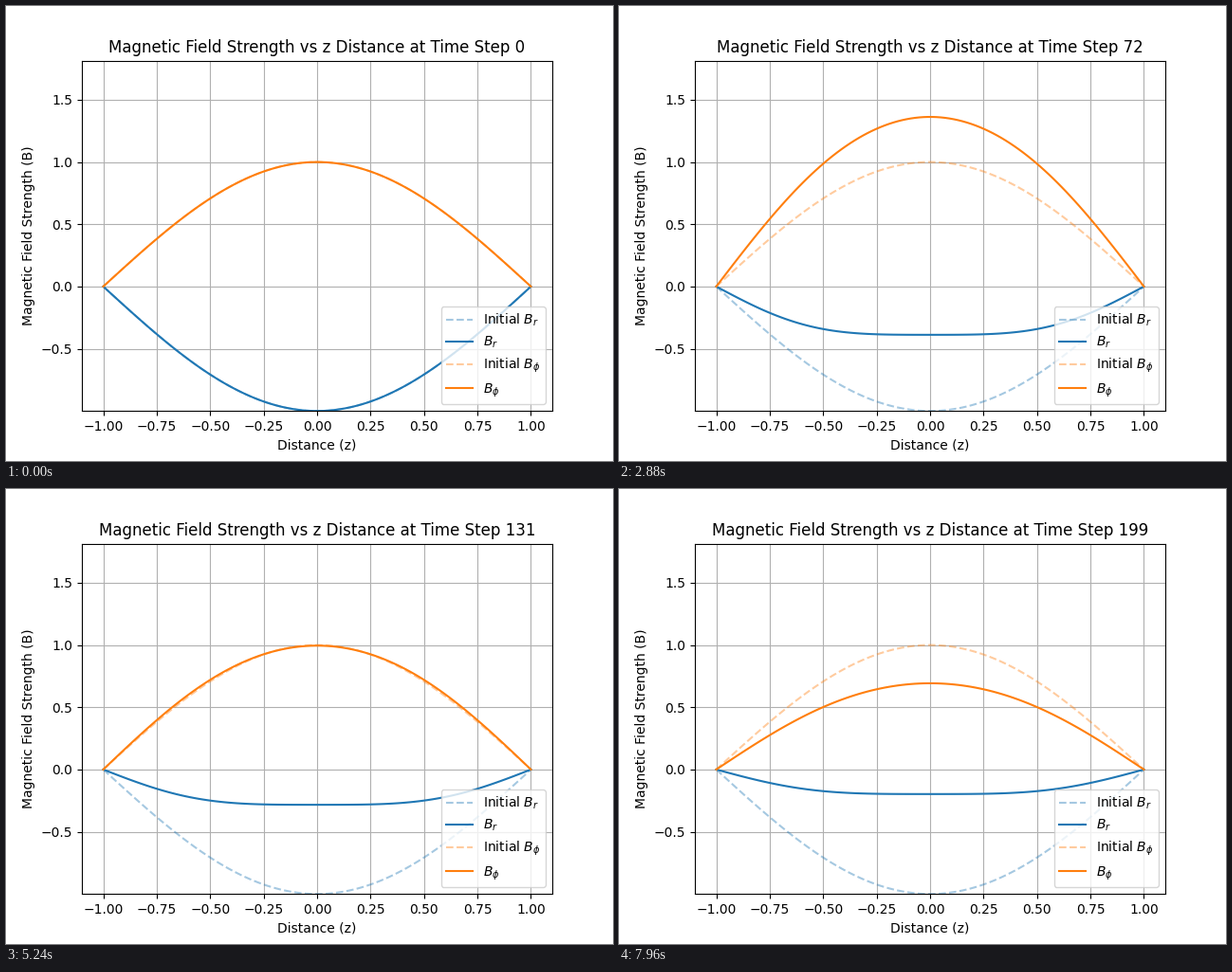
Write a matplotlib script that moves like this. It is 640 px wide and 480 px high and loops after 8000 ms.

```python
import numpy as np
import matplotlib.pyplot as plt
from matplotlib.animation import FuncAnimation

STEPS = 200
INTERVAL = 40

# Mean-field dynamo expanded in cos(n*pi*z/2) modes
MODES = np.array([1, 3, 5])
DECAY_R, DECAY_PHI = 0.12232, 0.10862
SHEAR, ALPHA = 0.3269, 0.03832

z = np.linspace(-1, 1, 100)
basis = np.cos(np.outer(z, MODES) * np.pi / 2)


def dynamo_matrix():
    """Linear operator acting on (Br modes, Bphi modes)."""
    k = len(MODES)
    alpha = np.zeros((k, k))
    for j, n in enumerate(MODES):
        alpha[max(j - 1, 0), j] -= ALPHA * n
        if j + 1 < k:
            alpha[j + 1, j] += ALPHA * n
    return np.block([
        [-DECAY_R * np.diag(MODES**2), alpha],
        [-SHEAR * np.eye(k), -DECAY_PHI * np.diag(MODES**2)],
    ])


start = np.array([-1, 0, 0, 1, 0, 0], dtype=float)
rates, vectors = np.linalg.eig(dynamo_matrix())
weights = np.linalg.solve(vectors, start)


def fields(step):
    state = (vectors @ (weights * np.exp(rates * step))).real
    return basis @ state[:3], basis @ state[3:]


br0, bphi0 = fields(0)

fig, ax = plt.subplots(figsize=(6.4, 4.8), dpi=100)
ax.plot(z, br0, "--", color="C0", alpha=0.4, label="Initial $B_r$")
br_line, = ax.plot(z, br0, color="C0", label="$B_r$")
ax.plot(z, bphi0, "--", color="C1", alpha=0.4, label=r"Initial $B_\phi$")
bphi_line, = ax.plot(z, bphi0, color="C1", label=r"$B_\phi$")

ax.set_xlim(-1.1, 1.1)
ax.set_ylim(br0.min(), 1.815)
ax.set_xlabel("Distance (z)")
ax.set_ylabel("Magnetic Field Strength (B)")
title = ax.set_title("")
ax.grid(True)
ax.legend(loc="lower right")


def update(step):
    br, bphi = fields(step)
    br_line.set_ydata(br)
    bphi_line.set_ydata(bphi)
    title.set_text(f"Magnetic Field Strength vs z Distance at Time Step {step}")
    return br_line, bphi_line, title


anim = FuncAnimation(fig, update, frames=STEPS, interval=INTERVAL,
                     repeat=True, repeat_delay=0, blit=False)
plt.show()
```
